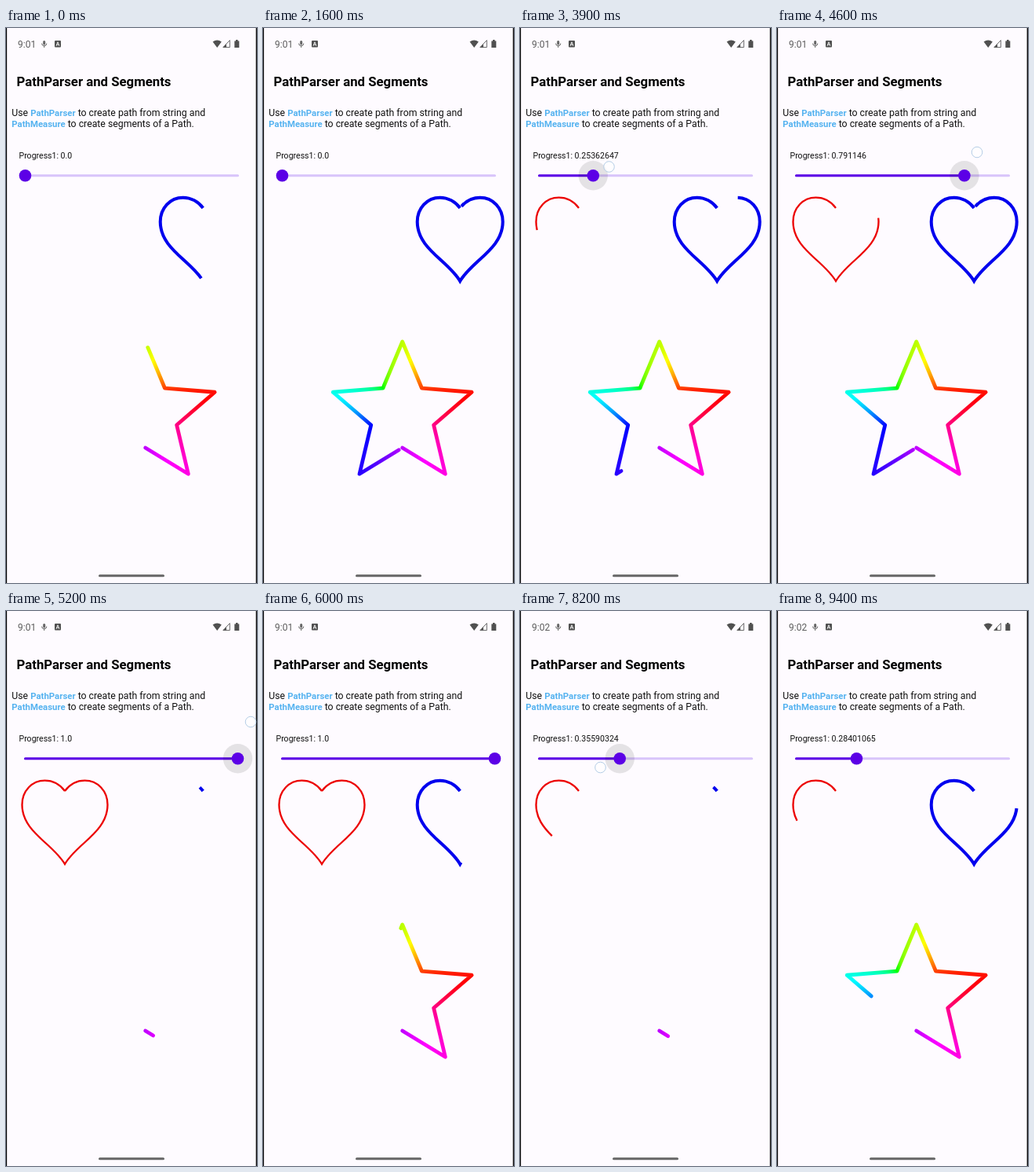
Animation, 320 px wide and 706 px high, one loop 9.5 s. Source, as an HTML page with a canvas:

```html
<!DOCTYPE html>
<html lang="en">
<head>
<meta charset="utf-8">
<style>
  html, body { margin: 0; width: 100%; height: 100%; overflow: hidden; background: #fefbff; }
  canvas, svg { position: absolute; left: 0; top: 0; }
  text { font-family: Roboto, sans-serif; font-size: 12.3px; white-space: pre; }
  .code { font-weight: 700; font-size: 11.4px; fill: #56b3f0; }
</style>
</head>
<body>
<canvas id="star" width="320" height="706"></canvas>
<svg width="320" height="706" viewBox="0 0 320 706" fill="none">
  <path d="M.5 0V706M319.3 0V706" stroke="#000" stroke-width="1.3"/>

  <!-- status bar -->
  <text id="clock" x="15" y="24.6" fill="#5c5c5c" style="font-size:12px">9:01</text>
  <g stroke="#666">
    <rect x="47.2" y="16" width="3" height="5.4" rx="1.5" fill="#666" stroke="none"/>
    <path d="M45.6 19.6a3.1 3.1 0 0 0 6.2 0M48.7 22.6V25"/>
  </g>
  <rect x="62" y="16" width="8" height="8.6" rx="1" fill="#505050"/>
  <path d="M64 22.8L66 17.8L68 22.8M64.8 21.2H67.2" stroke="#fff" stroke-width=".9"/>
  <path d="M263.6 17.6Q269.2 13.4 274.8 17.6L269.2 25Z" fill="#505050"/>
  <path d="M285.3 15.6V24.6H276.8Z" stroke="#666"/>
  <path d="M281 20.4V24.6H276.8Z" fill="#505050"/>
  <path d="M291.3 16.4H293V15H295.6V16.4H297.3V25H291.3Z" fill="#505050"/>

  <text x="13.5" y="73.7" fill="#000" style="font-size:16.8px;font-weight:700">PathParser and Segments</text>
  <text x="7.3" y="112" fill="#111">Use <tspan class="code">PathParser</tspan> to create path from string and</text>
  <text x="7.3" y="126.4" fill="#111"><tspan class="code">PathMeasure</tspan> to create segments of a Path.</text>
  <text id="label" x="16.5" y="166" fill="#111" style="font-size:10.55px"></text>

  <!-- slider -->
  <g stroke-width="3" stroke-linecap="round">
    <path d="M24.5 187.7H295.5" stroke="#d8c4fa"/>
    <path id="track" stroke="#5c00e6"/>
  </g>
  <circle id="ripple" cy="187.7" r="18.7" fill="#000" fill-opacity=".1"/>
  <circle id="thumb" cy="187.7" r="7.8" fill="#5c00e6"/>

  <path id="red" stroke="#ec0000" stroke-width="2.3" pathLength="1"
    d="M75 229C69 221 59.5 215.7 49.5 215.7C33 215.7 20.5 229 20.5 246.5C20.5 281 60 296 75 322C90 296 129.5 281 129.5 246.5C129.5 229 117 215.7 100.5 215.7C90.5 215.7 81 221 75 229Z"/>
  <path id="blue" stroke="#0000ee" stroke-width="4" pathLength="1" transform="translate(176.2 0)"/>

  <circle id="touch" r="6.8" fill="#fff" fill-opacity=".6" stroke="#b4cde6"/>
  <path d="M119.5 696.8H200.5" stroke="#666" stroke-width="3" stroke-linecap="round"/>
</svg>
<script>
const LOOP = 9500, STEP = 100;
const [star, clock, label, track, ripple, thumb, red, blue, touch] =
  ['star', 'clock', 'label', 'track', 'ripple', 'thumb', 'red', 'blue', 'touch']
    .map(id => document.getElementById(id));
const ctx = star.getContext('2d');
blue.setAttribute('d', red.getAttribute('d'));

// [time, slider value]
const valueKeys = [[0, 0], [3500, 0], [3600, .05], [3900, .25362647], [4600, .791146], [4900, 1],
  [7500, 1], [7600, .93], [8000, .51], [8200, .35590324], [8400, .22], [8600, .19],
  [8800, .28401065], [LOOP, .28401065]];
// [time, pointer x, pointer y]
const touchKeys = [[0, 52, 186], [3600, 52, 186], [3900, 113.5, 176.5], [4600, 255, 158], [5000, 312, 141],
  [5300, 312, 141], [7500, 283, 190], [8000, 150, 197], [8200, 102.5, 199], [8400, 74, 200],
  [8600, 78, 200], [8800, 101, 200], [LOOP, 101, 200]];

function sample(keys, t, column = 1) {
  const i = keys.findIndex(key => key[0] >= t);
  const b = keys[i], a = keys[Math.max(0, i - 1)];
  if (t === b[0]) return b[column];
  return a[column] + (b[column] - a[column]) * (t - a[0]) / (b[0] - a[0]);
}

// cubic-bezier(.4, 0, .2, 1)
function fastOutSlowIn(x) {
  let lo = 0, hi = 1, s;
  for (let i = 0; i < 24; i++) {
    s = (lo + hi) / 2;
    const u = 1 - s;
    if (1.2 * s * u * u + .6 * s * s * u + s ** 3 < x) lo = s; else hi = s;
  }
  return s * s * (3 - 2 * s);
}

// Star outline, starting at the bottom notch and running counter-clockwise
const points = Array.from({ length: 11 }, (_, i) => {
  const angle = Math.PI * (.5 - i / 5), r = i % 2 ? 93 : 42;
  return [177.7 + r * Math.cos(angle), 492 + r * Math.sin(angle)];
});
const outline = new Path2D();
points.forEach(p => outline.lineTo(...p));
const outlineLength = 10 * Math.hypot(points[1][0] - points[0][0], points[1][1] - points[0][1]);

const sweep = ctx.createConicGradient(0, 160, 470);
['#f00', '#f0f', '#00f', '#0ff', '#0f0', '#ff0', '#f00'].forEach((c, i) => sweep.addColorStop(i / 6, c));
Object.assign(ctx, { strokeStyle: sweep, lineWidth: 4.8, lineCap: 'round', lineJoin: 'round' });

function drawStar(progress) {
  ctx.clearRect(0, 0, 320, 706);
  ctx.setLineDash([progress * outlineLength, 2 * outlineLength]);
  ctx.stroke(outline);
}

function set(el, attrs) {
  for (const name in attrs) el.setAttribute(name, attrs[name]);
}

function render(t) {
  const value = sample(valueKeys, t);
  const lag = t > 7000 ? 30 : 0;
  const x = 24.5 + 271 * sample(valueKeys, t - lag);
  const pressed = (t >= 3600 && t <= 5300) || (t >= 7500 && t < 8800);
  const visibility = pressed ? 'visible' : 'hidden';

  clock.textContent = t < 7500 ? '9:01' : '9:02';
  label.textContent = 'Progress1: ' + (value % 1 ? +value.toFixed(8) : value.toFixed(1));
  set(track, { d: `M24.5 187.7H${x}`, visibility: value ? 'visible' : 'hidden' });
  set(thumb, { cx: x });
  set(ripple, { cx: x, visibility });
  set(touch, { cx: sample(touchKeys, t), cy: sample(touchKeys, t, 2), visibility });

  const progress = fastOutSlowIn((.345 + t / 2988) % 1);
  set(red, { 'stroke-dasharray': `${value} 2` });
  set(blue, { 'stroke-dasharray': `${progress} 2` });
  drawStar(progress);
}

const start = performance.now();
function frame() {
  const t = (performance.now() - start) % LOOP;
  render(Math.floor(t / STEP) * STEP);
  requestAnimationFrame(frame);
}
frame();
</script>
</body>
</html>
```
